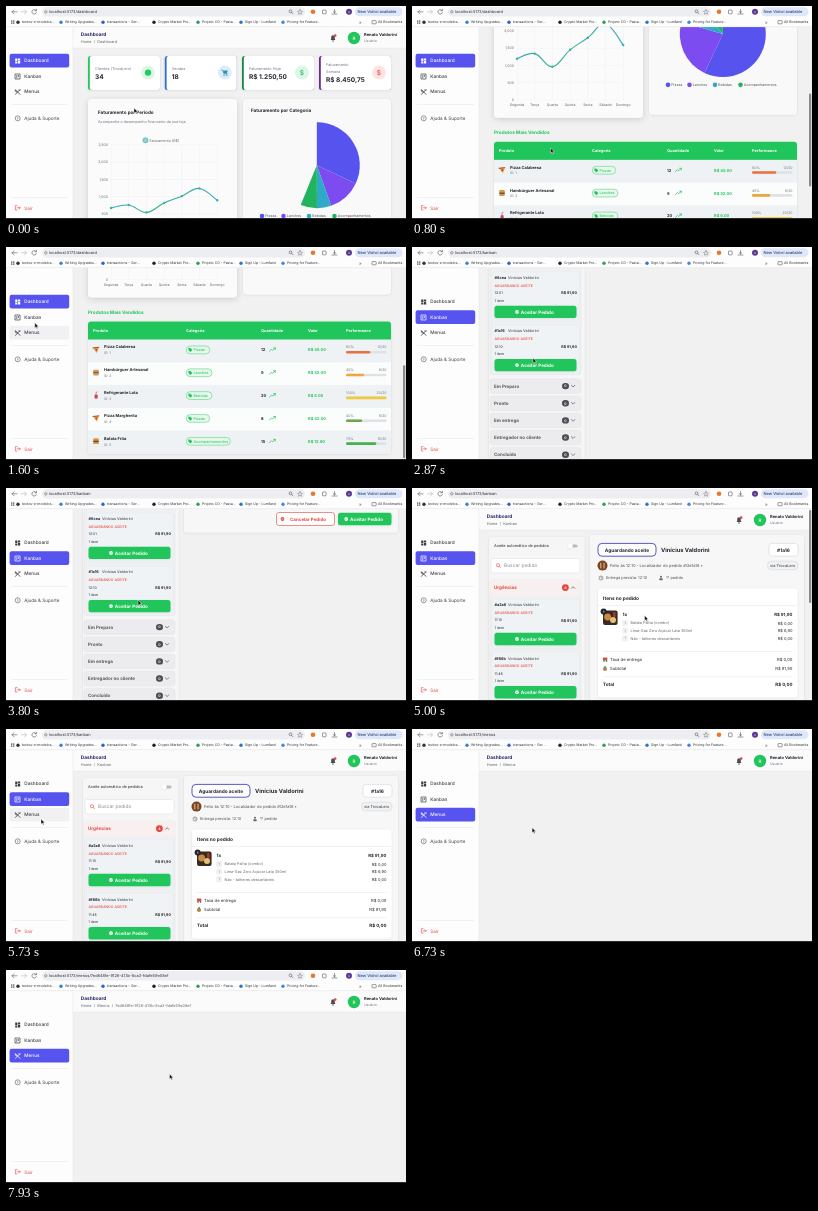
These frames come from a looping animation (400 px wide and 213 px high, 8000 ms). An HTML page:

```html
<!DOCTYPE html>
<html lang="pt-BR">
<head>
<meta charset="utf-8">
<title>Painel</title>
<style>
html, body { margin: 0; width: 100%; height: 100%; overflow: hidden; background: #f1f1f2; }
svg { display: block; width: 100vw; height: 100vh; }
text { font-family: Inter, Roboto, sans-serif; white-space: pre; text-rendering: geometricPrecision; }
</style>
</head>
<body>
<svg id="stage" viewBox="0 0 400 213" xmlns="http://www.w3.org/2000/svg"></svg>
<script>
const LOOP = 8000;
const INK = '#23242c', GRAY = '#74767f', GREEN = '#20c55b', RED = '#e5453f', INDIGO = '#5753ee', LINE = '#e4e5e8';
const USER = 'Renato Valdorini', CLIENT = 'Vinícius Valdorini', CHAT = 'TrocaLero';
const MENU_ID = '7ed848fe-9126-413b-8ca3-fdafe59e08ef';

// Shape helpers; text is centred vertically on y.
const text = (x, y, s, size = 4, fill = INK, weight = 400, anchor = 'start') =>
  `<text x="${x}" y="${y + size * .36}" font-size="${size}" fill="${fill}" font-weight="${weight}" text-anchor="${anchor}">${s}</text>`;
const bold = (x, y, s, size = 4, fill = INK, anchor) => text(x, y, s, size, fill, 700, anchor);
const rect = (x, y, w, h, fill, r = 0, extra = '') =>
  `<rect x="${x}" y="${y}" width="${w}" height="${h}" rx="${r}" fill="${fill}" ${extra}/>`;
const dot = (x, y, r, fill, extra = '') => `<circle cx="${x}" cy="${y}" r="${r}" fill="${fill}" ${extra}/>`;
const line = (d, color, w = .6, extra = '') =>
  `<path d="${d}" fill="none" stroke="${color}" stroke-width="${w}" stroke-linecap="round" stroke-linejoin="round" ${extra}/>`;
const group = (id, body, extra = '') => `<g id="${id}" ${extra}>${body}</g>`;
const shadow = 'filter="url(#soft)"';
const outline = c => `stroke="${c}" stroke-width=".6"`;
const each = (list, fn) => list.map(fn).join('');

function browserBar() {
  const marks = [[10, 'textos-e-modelos...', '#333'], [53, 'Writing Upgrades...', '#3b82c4'], [95, 'transactions - Ger...', '#2d62c9'],
    [146, 'Crypto Market Pro...', '#222'], [190, 'Projeto CG - Pasta...', '#2f9e58'], [233, 'Sign Up - Lumfarol', '#2a76c9'], [275, 'Pricing for Feature...', '#4285e8']];
  return rect(0, 0, 400, 21, '#fdfdfe') + rect(36, 1, 263, 9.6, '#eceef2', 4.8) +
    line('M11 5.8H6M8 3.8L6 5.8L8 7.8', '#555') + line('M15.5 5.8H20.5M18.5 3.8L20.5 5.8L18.5 7.8', '#b5b7bb') +
    line('M30.2 4.6A2.3 2.3 0 1 0 30.4 6.6M30.4 3.2V4.8H28.8', '#555') +
    dot(39.8, 5.8, 1.2, 'none', outline('#666')) +
    '<text id="url" x="43" y="7.3" font-size="3.95" fill="#2b2c31"></text>' +
    dot(284.5, 5.3, 1.4, 'none', outline('#555')) + line('M285.6 6.4L287 7.8', '#555') +
    line('M294 3.6L294.8 5.2L296.4 5.4L295.2 6.6L295.5 8.2L294 7.4L292.5 8.2L292.8 6.6L291.6 5.4L293.2 5.2Z', '#555', .4) +
    dot(307, 5.8, 2.3, '#e8762c') + rect(316.5, 4, 3.6, 3.8, 'none', .6, outline('#555')) +
    line('M326 8H331M328.5 3.5V6.8M327.2 5.6L328.5 6.8L329.8 5.6', '#555') +
    dot(343, 5.8, 3, '#5b3a93') + text(343, 5.8, 'v', 3, '#fff', 500, 'middle') +
    rect(349, 1.2, 47.5, 9, '#dfe8fb', 4.5) + text(351.5, 5.8, 'New Vidrol available', 4, '#28406e', 500) +
    each([0, 1, 2, 3], i => rect(5 + i % 2 * 2, 14.4 + (i >> 1) * 2, 1.4, 1.4, '#666')) +
    each(marks, ([x, s, c]) => dot(x + 2, 16.2, 1.7, c) + text(x + 6, 16.2, s, 3.5, '#333')) +
    text(353, 16, '»', 4.5, '#555') + rect(366, 14.6, 4.2, 3.2, 'none', .5, outline('#555')) +
    text(372, 16.2, 'All Bookmarks', 3.6, '#333') + rect(0, 20.6, 400, .5, '#dcdde0');
}

const ICONS = {
  grid: '<path fill="currentColor" d="M9.2 52.4h2.2v2.8h-2.2zM12 52.4h2.2v1.6h-2.2zM9.2 55.8h2.2v1.6h-2.2zM12 54.6h2.2v2.8h-2.2z"/>',
  board: line('M9.4 68H14V73H9.4ZM10.8 69.4V71.8M12.4 69.4V70.6', 'currentColor', .7),
  fork: line('M9.4 83.6L14 88.4M14 83.6L9.4 88.4M13 83.6L14 84.6M9.2 84.4Q9.2 86 10.8 86', 'currentColor', .8)
};
function sidebar() {
  const items = [['Dashboard', 54.8, ICONS.grid], ['Kanban', 70.3, ICONS.board], ['Menus', 85.8, ICONS.fork]];
  return rect(0, 21, 67, 192, '#fdfdfe') + rect(66.7, 21, .5, 192, '#e6e7ea') +
    each(items, ([name, y, icon], i) => group('item' + i,
      rect(3.6, y - 7, 59.6, 13.6, INDIGO, 2) + icon + text(18.3, y, name, 4.7, 'currentColor', 500))) +
    rect(5, 98.5, 57, .5, LINE) + dot(11.7, 112.3, 2.5, 'none', outline('#555')) + text(11.7, 112.4, '?', 3.4, '#555', 600, 'middle') +
    text(18.3, 112.3, 'Ajuda &amp; Suporte', 4.6, '#3c3d44') + rect(5, 191.5, 57, .5, LINE) +
    line('M11 199.6H9.4V204H11M11 201.8H14.2M13 200.6L14.2 201.8L13 203', RED) + text(18.3, 202, 'Sair', 4.6, RED);
}

function header() {
  return rect(67, 21, 333, 21, '#fbfbfc') + rect(67, 41.8, 333, .5, '#e3e4e7') +
    bold(74.8, 28.4, 'Dashboard', 4.8, '#25246b') +
    '<text id="crumb" x="74.8" y="37.4" font-size="3.85" fill="#63656e"></text>' +
    '<path d="M324.6 34H329.4L328.8 32.8V31A1.8 1.8 0 0 0 325.2 31V32.8ZM326.2 34.6H327.8V35.4H326.2Z" fill="#4a4b52"/>' + dot(329.2, 29.6, 1.3, RED) +
    dot(348, 32, 6.2, GREEN) + text(348, 32.1, USER[0], 4.6, '#fff', 500, 'middle') +
    bold(358, 28.4, USER, 4.1) + text(358, 35, 'Usuário', 3.5, GRAY);
}

// Line chart values and pie shares
const SALES = [1190, 1340, 960, 1450, 1800, 2200, 1590];
const DAYS = ['Segunda', 'Terça', 'Quarta', 'Quinta', 'Sexta', 'Sábado', 'Domingo'];
const SHARES = [['Pizzas', .57, INDIGO, 256], ['Lanches', .225, '#7c4cf0', 277.5], ['Bebidas', .095, '#2fa9c8', 303], ['Acompanhamentos', .11, '#22b35f', 328.5]];
const BASE = 225, dayX = i => 105 + i * 17.7, saleY = v => BASE - v * .0345;

function statCard(x, color, label, value, tint, sign) {
  const two = label.length > 1;
  return rect(x, 50, 72, 34, color, 2.5, shadow) + rect(x + 1.8, 50, 70.2, 34, '#fff', 2) +
    each(label, (s, i) => text(x + 7, two ? 59 + i * 6.4 : 62.6, s, 3.8, GRAY)) +
    bold(x + 7, two ? 73.6 : 70.8, value, 6.5) + dot(x + 60, 66.6, 7, tint) + sign(x + 60, 66.6);
}
const money = c => (x, y) => text(x, y, '$', 6.6, c, 500, 'middle');
const cart = (x, y) => line(`M${x - 3} ${y - 2.4}h1l1.2 3.6h3.4`, '#3489b8', .8) + `<path d="M${x - 1.7} ${y - 2}h4.8l-1.2 2.6h-2.8z" fill="#3489b8"/>` +
  dot(x - .8, y + 2.6, .7, '#3489b8') + dot(x + 2, y + 2.6, .7, '#3489b8');

const PRODUCTS = [['Pizza Calabresa', 'Pizzas', 12, '45.00', '#ea7040'], ['Hambúrguer Artesanal', 'Lanches', 9, '32.00', '#f0a63e'],
  ['Refrigerante Lata', 'Bebidas', 20, '6.00', '#f0c93f'], ['Pizza Margherita', 'Pizzas', 8, '42.00', '#6aa845'], ['Batata Frita', 'Acompanhamentos', 15, '12.90', '#48b04c']];
const slice = y => `<path d="M87 ${y - 2.2}l6 -.4l-2.2 5.6z" fill="#e79a3c"/>` + line(`M87 ${y - 2}l5.8 -.6`, '#a9502a', 1) + dot(90.3, y, .9, '#cf3c30');
const burger = y => rect(87.2, y - 3, 5.6, 2.6, '#d9964a', 1.2) + rect(87.2, y - .6, 5.6, 1.4, '#67412a') + rect(87.2, y + .8, 5.6, 2, '#d9964a', .8);
const drink = y => rect(88.6, y - .8, 3, 3.8, '#cf3f45', .5) + line(`M90 ${y - 1}v-2.2l1 -.4`, '#8d4c5c', .6);
const foods = [slice, burger, drink, slice, burger];

function productRow([name, kind, count, price, color], i) {
  const y = 296.4 + i * 22.85, pct = count * 5, w = 9.6 + kind.length * 2.3;
  return rect(82, y - 11.4, 303, 22.85, i % 2 ? '#fbfcfc' : '#eff2f4') + rect(82, y + 11.2, 303, .3, '#e0e3e6') + foods[i](y - 1) +
    bold(98, y - 4, name, 4) + text(98, y + 2, 'ID: ' + (i + 1), 3.4, GRAY) +
    rect(180.3, y - 4.9, w, 7.8, '#e6f8ec', 3.9, 'stroke="#42cb73" stroke-width=".5"') +
    `<path d="M182.4 ${y - 2.8}h2l2 2l-2 2l-2 -2z" fill="${GREEN}"/>` + text(187.4, y - 1, kind, 3.8, GREEN) +
    bold(255, y - 1, count, 4) + line(`M263.5 ${y + .4}l2 -2l1.2 1.2l2.6 -2.6m-1.7 0h1.7v1.7`, GREEN, .7) +
    bold(302, y - 1, 'R$ ' + price, 4, GREEN) + text(340, y - 3.8, pct + '%', 3.5, GRAY) + text(380.5, y - 3.8, count + '/20', 3.5, GRAY, 400, 'end') +
    rect(340, y, 40.5, 2.6, '#dfe2e5', 1.3) + rect(340, y, 40.5 * pct / 100, 2.6, color, 1.3);
}

function dashboard() {
  return statCard(82, '#27c45f', [`Clientes (${CHAT})`], '34', '#dcf7e5', (x, y) => dot(x, y, 3.2, '#25c964')) +
    statCard(158.8, '#2f6fd0', ['Vendas'], '18', '#dbeef8', cart) +
    statCard(236, '#158a43', ['Faturamento Hoje'], 'R$ 1.250,50', '#dcf7e5', money('#27b35b')) +
    statCard(313, '#6d2597', ['Faturamento', 'Semana'], 'R$ 8.450,75', '#fde4e3', money(RED)) +
    rect(82, 93, 149, 150, '#fbfbfc', 4, 'filter="url(#deep)"') + rect(237, 93, 148, 147, '#f9f9fa', 4, shadow) +
    bold(92, 106.5, 'Faturamento por Período', 4.6) + text(92, 115.6, 'Acompanhe o desempenho financeiro da sua loja', 3.75, GRAY) +
    dot(139.5, 134.3, 2.6, '#8fd0d6', outline('#3aaeb4')) + text(143.5, 134.3, 'Faturamento (R$)', 3.6, '#666') +
    each([0, 500, 1000, 1500, 2000, 2500], v => rect(105, saleY(v), 106.2, .3, '#ebecee') +
      text(102, saleY(v), v.toLocaleString('en-US'), 3.5, '#666', 400, 'end')) +
    each(DAYS, (d, i) => rect(dayX(i), saleY(2500), .3, BASE - saleY(2500), '#ebecee') + text(dayX(i), 230.3, d, 3.5, '#666', 400, 'middle')) +
    line('', 'url(#sales)', 1.1, 'id="curve"') + each(SALES, () => dot(0, 0, 1.2, '#3aaeb4', 'class="sale"')) +
    bold(245, 104.6, 'Faturamento por Categoria', 4.6) +
    each(SHARES, ([name, , c, x]) => `<path class="wedge" fill="${c}"/>` + dot(x, 210, 2.3, c) + text(x + 3.3, 210, name, 3.6, '#555')) +
    bold(82, 257.8, 'Produtos Mais Vendidos', 4.7, GREEN) +
    rect(82, 267, 303, 132.5, '#fff', 3, shadow) + rect(82, 267, 303, 18.5, GREEN, 3) + rect(82, 272, 303, 13.5, GREEN) +
    each([['Produto', 87], ['Categoria', 180], ['Quantidade', 255], ['Valor', 302], ['Performance', 340]], ([s, x]) => bold(x, 275.7, s, 3.9, '#fff')) +
    each(PRODUCTS, productRow);
}

const greenButton = (x, y, w) => rect(x, y, w, 12.4, GREEN, 2.5, shadow) +
  dot(x + w / 2 - 18.5, y + 6.2, 1.9, '#fff') + line(`M${x + w / 2 - 19.4} ${y + 6.2}l.7 .7l1.2 -1.3`, GREEN, .5) +
  bold(x + w / 2 + 1.8, y + 6.2, 'Aceitar Pedido', 4.6, '#fff', 'middle');
const chevron = (y, up) => line(up ? `M159.4 ${y + .8}l1.7 -1.7l1.7 1.7` : `M159.4 ${y - .8}l1.7 1.7l1.7 -1.7`, '#555', .7);

function order([code, time], i) {
  const y = 117 + i * 53.2;
  return rect(80, y - 6, 87, 49.5, '#f0f3f5', 2, 'stroke="#e4e5e8" stroke-width=".4"') +
    bold(82.5, y, code, 3.8) + text(96, y, CLIENT, 3.8, '#33343b') + text(82.5, y + 7.6, 'AGUARDANDO ACEITE', 3.5, RED, 500) +
    text(82.5, y + 15.2, time, 3.5) + bold(165, y + 15.2, 'R$ 91,90', 3.7, INK, 'end') + text(82.5, y + 23, '1 item', 3.5) + greenButton(82.5, y + 27.8, 82);
}

function orders() {
  const stages = ['Em Preparo', 'Pronto', 'Em entrega', 'Entregador no cliente', 'Concluído'];
  return rect(77, 49, 95.5, 365, '#f6f6f7', 3, shadow) + text(82, 58, 'Aceite automático de pedidos', 3.9) +
    rect(156.5, 56.4, 9, 3.2, '#b9bbc0', 1.6) + dot(158.4, 58, 2.4, '#fff', shadow) +
    rect(79, 70.5, 89, 14.5, '#fff', 2.5, outline('#e0e1e5')) + dot(86, 77.2, 1.6, 'none', outline(RED)) + line('M87.2 78.4L88.5 79.7', RED) +
    text(92, 77.7, 'Buscar pedido', 4.9, '#8d8f97') +
    rect(78, 92, 91, 228, '#eff0f1', 2.5, 'stroke="#dfe0e3" stroke-width=".5"') + rect(78, 92, 91, 15, '#f8efef', 2.5) +
    bold(82, 99.6, 'Urgências', 4.6, RED) + dot(153.4, 99.6, 3.4, RED) + bold(153.4, 99.6, '4', 3.5, '#fff', 'middle') + chevron(99.6, true) +
    each([['#a2a6', '11:10'], ['#f86b', '11:48'], ['#6cea', '12:01'], ['#1a16', '12:10']], order) +
    each(stages, (s, i) => rect(78, 324.3 + i * 17.15, 91, 14.6, '#ececee', 2.5, 'stroke="#e0e1e3" stroke-width=".4"') +
      bold(82, 331.6 + i * 17.15, s, 4.5, '#55575f') + rect(150, 328.4 + i * 17.15, 7, 6.4, '#4b4d55', 3.2) +
      bold(153.5, 331.6 + i * 17.15, '0', 3.5, '#fff', 'middle') + chevron(331.6 + i * 17.15));
}

function detail() {
  const extras = [['Batata Palha (combo)', '0,00'], ['Lima-Gaz Zero Açúcar Lata 350ml', '6,90'], ['Não - talheres descartáveis', '0,00']];
  const right = (y, s, size = 4, w = 400) => text(380.5, y, 'R$ ' + s, size, INK, w, 'end');
  return rect(178, 47, 214, 190, '#f7f7f8', 3, shadow) +
    rect(186, 55.4, 58, 12.8, '#fdfdff', 4, 'stroke="#4a49b8" stroke-width=".9"') + bold(215, 61.8, 'Aguardando aceite', 4.8, INK, 'middle') +
    bold(249, 61.8, CLIENT, 5.7) + rect(357, 55.4, 29, 12.8, '#fff', 3, outline('#d4d6da')) + bold(371.5, 61.8, '#1a16', 4.8, INK, 'middle') +
    dot(190.5, 77.6, 5, '#7a4524') + line('M188.8 75.2V80M192 75.2V80', '#f3d4a6', .9) +
    text(198, 77.6, 'Feito às 12:10 - Localizador do pedido #l2e1a16 •', 4.05, '#4c4e56') +
    rect(355.5, 73.2, 30.5, 8.6, '#f1f2f4', 4, outline('#d4d6da')) + text(370.7, 77.5, 'via ' + CHAT, 3.9, '#4c4e56', 500, 'middle') +
    dot(189, 90, 2, 'none', outline('#666')) + line('M189 88.9V90L189.8 90.5', '#666', .5) + text(194, 90, 'Entrega prevista: 12:10', 3.9, '#4c4e56') +
    dot(249, 88.8, 1, '#666') + rect(247.2, 90.2, 3.6, 2, '#666', 1) + text(254, 90, '1° pedido', 3.9, '#4c4e56') +
    rect(186, 100.5, 199.5, 109, '#fff', 3, shadow) + bold(191, 110, 'Itens no pedido', 4.8) + rect(186, 117, 199.5, .5, LINE) +
    rect(191, 122.5, 14.6, 14.6, '#3b2a20', 2) + dot(195.6, 129, 3.4, '#c98a45') + dot(201, 132, 3, '#e4c07a') + rect(201, 124, 2.6, 5, '#a33a2d', 1) +
    dot(191.6, 123.4, 3, '#23242c') + bold(191.6, 123.4, '1', 3.2, '#fff', 'middle') + bold(210.5, 126, '1x', 4.5) + right(126, '91,90', 4.3, 700) +
    each(extras, ([s, v], i) => rect(210.6, 132.4 + i * 7.6, 5, 5.4, '#f2f3f5', 1, 'stroke="#dcdde1" stroke-width=".3"') +
      text(213.1, 135.1 + i * 7.6, '1', 3.2, GRAY, 400, 'middle') + text(218.6, 135.1 + i * 7.6, s, 3.8, '#666871') + right(135.1 + i * 7.6, v, 4)) +
    rect(191, 163, 189.5, .5, LINE) + rect(190.8, 169.6, 4.6, 2.8, '#d0553d', .8) + dot(192, 173, .8, '#444') + dot(194.6, 173, .8, '#444') +
    text(198, 171.2, 'Taxa de entrega', 4.2) + right(171.2, '0,00', 4.2) +
    dot(193, 181, 2.1, '#ad8a4d') + rect(192.2, 178.2, 1.8, 1.4, '#5f8a4a') + text(198, 180.8, 'Subtotal', 4.2) + right(180.8, '91,90', 4.2) +
    rect(191, 188.6, 189.5, .5, LINE) + bold(191, 196.6, 'Total', 4.6) + right(196.6, '0,00', 4.5, 700) +
    rect(270.5, 217, 58, 13, '#fff', 2.5, outline(RED)) + dot(276.5, 223.5, 1.9, RED) + line('M275.8 222.8l1.4 1.4m0 -1.4l-1.4 1.4', '#fff', .4) +
    bold(302, 223.5, 'Cancelar Pedido', 4.5, RED, 'middle') + greenButton(332, 217.3, 53.5);
}

const stage = document.getElementById('stage');
stage.innerHTML = `<defs>
  <filter id="soft" x="-10%" y="-10%" width="120%" height="130%"><feDropShadow dx="0" dy=".5" stdDeviation=".9" flood-opacity=".1"/></filter>
  <filter id="deep" x="-10%" y="-10%" width="120%" height="120%"><feDropShadow dx="0" dy="1.6" stdDeviation="3" flood-opacity=".15"/></filter>
  <linearGradient id="sales" gradientUnits="userSpaceOnUse" x1="105" x2="211" y1="0" y2="0"><stop stop-color="#35a9c4"/><stop offset=".35" stop-color="#33b37c"/><stop offset="1" stop-color="#35a9c4"/></linearGradient>
  <clipPath id="view"><rect x="67" y="21" width="333" height="192"/></clipPath></defs>` +
  rect(0, 0, 400, 213, '#f1f1f2') +
  `<g clip-path="url(#view)">${group('page', header() + group('dash', dashboard()) + group('orders', orders()) + group('detail', detail()))}</g>` +
  sidebar() + browserBar() + rect(397, 22, 2.3, 93, '#8b8c90', 1.1, 'id="thumb"') + rect(0, 212, 400, 1, '#2a2a2c') +
  group('cursor', '<path d="M0 0V5.2L1.3 4.1L2.1 6L3 5.6L2.2 3.8H3.8Z" fill="#111" stroke="#fff" stroke-width=".45"/>');

const el = id => document.getElementById(id);
const ui = Object.fromEntries(['page', 'dash', 'orders', 'detail', 'url', 'crumb', 'thumb', 'cursor', 'curve'].map(id => [id, el(id)]));
const items = [0, 1, 2].map(i => el('item' + i));
const saleDots = [...document.querySelectorAll('.sale')], wedges = [...document.querySelectorAll('.wedge')];

const VIEWS = [[0, 0, 'dashboard', 'Dashboard'], [1740, 1, 'kanban', 'Kanban'], [5960, 2, 'menus', 'Menus'],
  [7250, 2, 'menus/' + MENU_ID, 'Menus  /  ' + MENU_ID]];
const DETAIL_AT = 3560;
const SCROLL = [[0, 0], [120, 0], [450, 62], [800, 131], [1200, 192.5], [3850, 192.5], [4180, 125], [4470, 45], [4750, 0]];
const POINTER = [[0, 128, 102], [300, 130, 108], [800, 138.5, 142], [1150, 136, 140], [1600, 28.8, 75.8], [1720, 29, 70], [2100, 30, 70],
  [2870, 121, 111], [3650, 121, 110], [4470, 245, 133], [4950, 235, 128], [5730, 35, 90], [6150, 35, 88], [7100, 163, 104], [8000, 163.5, 104]];

// Samples one column of a keyframe table with smooth or linear steps.
function sample(table, t, col, smooth) {
  const next = table.findIndex(k => k[0] > t), i = next < 0 ? table.length - 1 : next;
  const a = table[i - 1], b = table[i];
  let p = Math.min(1, (t - a[0]) / (b[0] - a[0]));
  if (smooth) p = p * p * (3 - 2 * p);
  return a[col] + (b[col] - a[col]) * p;
}

function drawCharts(t) {
  const grow = 1 - (1 - Math.min(1, (t + 185) / 1000)) ** 4;
  const pts = SALES.map((v, i) => [dayX(i), saleY(v * grow)]);
  const at = i => pts[Math.max(0, Math.min(pts.length - 1, i))];
  const handle = (i, s) => at(i).map((v, k) => v + s * .2 * (at(i + 1)[k] - at(i - 1)[k]));
  ui.curve.setAttribute('d', 'M' + pts[0] + pts.slice(1).map((p, i) => `C${handle(i, 1)} ${handle(i + 1, -1)} ${p}`).join(''));
  saleDots.forEach((d, i) => { d.setAttribute('cx', pts[i][0]); d.setAttribute('cy', pts[i][1]); });
  let a = 0;
  const rim = q => [310.8 + 43 * Math.sin(q), 159.2 - 43 * Math.cos(q)];
  wedges.forEach((w, i) => {
    const b = a + SHARES[i][1] * grow * 2 * Math.PI;
    w.setAttribute('d', `M310.8 159.2L${rim(a)}A43 43 0 ${b - a > Math.PI ? 1 : 0} 1 ${rim(b)}Z`);
    a = b;
  });
}

function render(now) {
  const t = now % LOOP;
  const [, active, path, crumb] = VIEWS.filter(v => v[0] <= t).pop();
  const scroll = sample(SCROLL, t, 1), x = sample(POINTER, t, 1, true), y = sample(POINTER, t, 2, true);
  const show = (node, on) => node.setAttribute('visibility', on ? 'visible' : 'hidden');
  show(ui.dash, active === 0);
  show(ui.orders, active === 1);
  show(ui.detail, active === 1 && t >= DETAIL_AT);
  ui.url.textContent = 'localhost:5173/' + path;
  ui.crumb.textContent = 'Home  /  ' + crumb;
  ui.page.setAttribute('transform', `translate(0 ${-scroll})`);
  ui.thumb.setAttribute('y', 22 + scroll / 2);
  show(ui.thumb, t > 120 && t < 1740 || t > 3850 && t < 5300);
  ui.cursor.setAttribute('transform', `translate(${x} ${y})`);
  items.forEach((g, i) => {
    const on = i === active, top = 62.5 + (i - 1) * 13;
    const hover = !on && x < 63 && y >= top && y < top + 13 + (i === 2 ? 18 : 0);
    g.style.color = on ? '#fff' : '#3c3d44';
    g.firstChild.setAttribute('fill', on ? INDIGO : hover ? '#f1f1f4' : 'none');
  });
  if (active === 0) drawCharts(t);
}

const start = performance.now();
function tick() {
  render(performance.now() - start);
  requestAnimationFrame(tick);
}
tick();
</script>
</body>
</html>
```
